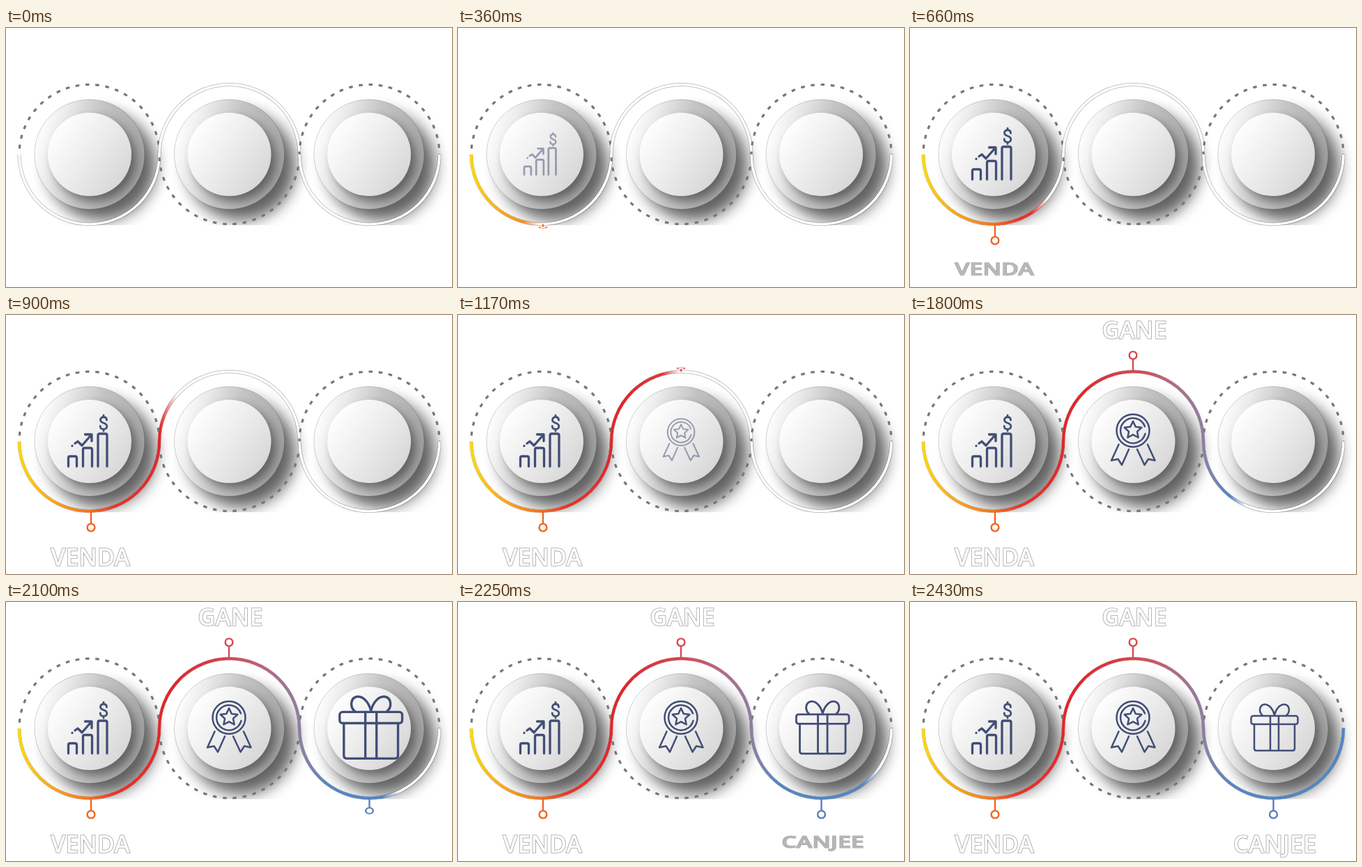
Write an HTML page that moves like this. It is 640 by 373 pixels and loops after 8 s.

```html
<!DOCTYPE html>
<html lang="es">
<head>
<meta charset="utf-8">
<title>Venda, gane, canjee</title>
<style>
  html, body { margin: 0; width: 100%; height: 100%; overflow: hidden; background: #fff; }
  svg { display: block; width: 100%; height: 100%; }
  text { font: 600 34px "Open Sans", "Noto Sans", sans-serif; text-anchor: middle; }
  .halo { fill: none; stroke: #000; stroke-opacity: .36; stroke-width: 1.6; }
  .icon, .icon path, .icon circle, .icon rect {
    fill: none; stroke: #414e75; stroke-linecap: round; stroke-linejoin: round;
  }
  .track path { fill: none; }
</style>
</head>
<body>
<svg id="stage" viewBox="0 0 640 373">
  <defs>
    <linearGradient id="rim" x1="0" y1=".36" x2="1" y2=".64">
      <stop offset="0" stop-color="#fff"/>
      <stop offset=".2" stop-color="#ebebeb"/>
      <stop offset=".5" stop-color="#c4c4c4"/>
      <stop offset="1" stop-color="#a0a0a0"/>
    </linearGradient>
    <linearGradient id="face" x1=".1" y1=".2" x2=".9" y2=".8">
      <stop offset="0" stop-color="#fefefe"/>
      <stop offset=".5" stop-color="#ececec"/>
      <stop offset="1" stop-color="#d8d8d8"/>
    </linearGradient>
    <linearGradient id="hues" gradientUnits="userSpaceOnUse" x1="19" y1="0" x2="622" y2="0">
      <stop offset="0" stop-color="#ffd800"/>
      <stop offset=".08" stop-color="#f9a51b"/>
      <stop offset=".17" stop-color="#f3701f"/>
      <stop offset=".23" stop-color="#ec3028"/>
      <stop offset=".36" stop-color="#e32228"/>
      <stop offset=".5" stop-color="#d9444c"/>
      <stop offset=".59" stop-color="#b8667f"/>
      <stop offset=".67" stop-color="#8a7ea4"/>
      <stop offset=".73" stop-color="#5585c3"/>
      <stop offset="1" stop-color="#4f84c6"/>
    </linearGradient>
    <linearGradient id="edge">
      <stop offset=".94" stop-color="#fff"/>
      <stop offset="1" stop-color="#fff" stop-opacity="0"/>
    </linearGradient>
    <filter id="soft" x="-40%" y="-40%" width="180%" height="180%"><feGaussianBlur stdDeviation="11"/></filter>
    <filter id="inner" x="-30%" y="-30%" width="160%" height="160%"><feGaussianBlur stdDeviation="7"/></filter>
    <clipPath id="cut"><rect width="640" height="284"/></clipPath>
  </defs>
</svg>
<script>
const LOOP = 8000, STEP = 30, CY = 182, R = 100.5;
const stage = document.getElementById('stage');

const chart = `<g class="icon" stroke-width="3.3">
  <path d="M89.5 218V206q0-2.500 2.500-2.500h7q2.500 0 2.500 2.500V218M110.500 218V194q0-2.500 2.500-2.500h8q2.500 0 2.500 2.500V218M132 218V173.500q0-2.500 2.500-2.500h8q2.500 0 2.500 2.500V218"/>
  <path d="M95 188.500v.1M99 185l4-3 6 6 13.500-15.500M113.500 172H123V181.500"/>
  <path d="M144.500 151.500c0-3-2-4.500-4.500-4.500s-4.500 1.500-4.500 4 2 3.700 4.500 4.500 4.800 2 4.800 4.700-2.300 4.300-4.800 4.300-4.800-1.500-4.800-4.500M140 144.500v2.500M140 164.500v2.500" stroke-width="2.800"/>
</g>`;

function star(cx, cy, outer, inner) {
  const pts = Array.from({ length: 10 }, (_, i) => {
    const a = -Math.PI / 2 + i * Math.PI / 5, r = i % 2 ? inner : outer;
    return `${(cx + r * Math.cos(a)).toFixed(2)} ${(cy + r * Math.sin(a)).toFixed(2)}`;
  });
  return `M${pts.join('L')}Z`;
}

const medal = `<g class="icon" stroke-width="2.500">
  <circle cx="320" cy="166.500" r="23.500"/>
  <path d="M337.500 171A18 18 0 1 1 337 160.500M334 177.500a18 18 0 0 0 2-3"/>
  <path d="${star(320, 166, 13, 6.3)}"/>
  <path d="M299.500 186.500L289 209.500 298.500 207.500 304 216 314 193.500M326 193.500L336.500 216 342 207.500 351.500 209.500 341 186.500"/>
</g>`;

const gift = `<g class="icon" stroke-width="2.500">
  <rect x="489.500" y="164" width="67" height="12" rx="3"/>
  <path d="M494 176V211q0 3 3 3H549q3 0 3-3V176M517 164V214M529 164V214"/>
  <path d="M523 163C521 154 515 147 508.500 147.500 501 148.500 500 158.500 506 163.500M523 163C525 154 531 147 537.500 147.500 545 148.500 546 158.500 540 163.500"/>
</g>`;

// cx: disc, ring: track circle, px: pin, tx: label
const steps = [
  { cx: 120, ring: 119.5, px: 122, tx: 121, start: 60, lead: 5, dash: -3, down: true, label: 'VENDA', hue: '#f2641f', icon: chart, iy: 181 },
  { cx: 320.5, ring: 320.5, px: 320, tx: 322, start: 870, lead: 5, dash: -7, down: false, label: 'GANE', hue: '#da4a52', icon: medal, iy: 179 },
  { cx: 521, ring: 521.5, px: 521.5, tx: 523.5, start: 1680, lead: 18, dash: 1.5, down: true, label: 'CANJEE', hue: '#567fbd', icon: gift, iy: 180.5 }
];

const arc = (cx, down) => `M${cx - R} ${CY}A${R} ${R} 0 0 ${down ? 0 : 1} ${cx + R} ${CY}`;

const shadows = steps.map(s =>
  `<circle cx="${s.cx + 17}" cy="${CY + 17}" r="78" opacity=".62" filter="url(#soft)"/>`).join('');

const discs = steps.map((s, i) => `
  <clipPath id="disc${i}"><circle cx="${s.cx}" cy="${CY}" r="79"/></clipPath>
  <circle cx="${s.cx}" cy="${CY}" r="79" fill="url(#rim)" stroke="#000" stroke-opacity=".22" stroke-width=".8"/>
  <g clip-path="url(#disc${i})">
    <circle cx="${s.cx + 7}" cy="${CY + 8}" r="60" opacity=".44" filter="url(#inner)"/>
  </g>
  <circle cx="${s.cx}" cy="${CY}" r="60" fill="url(#face)"/>`).join('');

const period = Math.PI * R / 22, dashLength = 5.5;
const tracks = steps.map(s => `<g class="track">
  <path d="${arc(s.ring, !s.down)}" stroke="#777" stroke-width="3.200" stroke-dasharray="${dashLength} ${period - dashLength}" stroke-dashoffset="${dashLength / 2 - s.dash}"/>
  <path d="${arc(s.ring, s.down)}" stroke="#000" stroke-opacity=".3" stroke-width="5"/>
  <path d="${arc(s.ring, s.down)}" stroke="#fff" stroke-width="3.600"/>
</g>`).join('');

const moving = steps.map((s, i) => {
  const dir = s.down ? 1 : -1, base = CY + dir * R;
  return `
  <mask id="wipe${i}" maskUnits="userSpaceOnUse" x="0" y="0" width="640" height="373">
    <rect id="sweep${i}" y="0" width="400" height="373" fill="url(#edge)"/>
  </mask>
  <g class="track" mask="url(#wipe${i})">
    <path d="${arc(s.ring, s.down)}" stroke="url(#hues)" stroke-width="4"/>
  </g>
  <g id="pin${i}" stroke="${s.hue}" stroke-width="2.400" fill="#fff">
    <path d="M${s.px} ${base}v${dir * 18}"/>
    <circle cx="${s.px}" cy="${base + dir * 23.5}" r="5.400"/>
  </g>
  <g id="icon${i}">${s.icon}</g>
  <g id="label${i}">
    <text class="halo" x="${s.tx}" y="${s.down ? 361 : 34}">${s.label}</text>
    <text class="fill" x="${s.tx}" y="${s.down ? 361 : 34}">${s.label}</text>
  </g>`;
}).join('');

stage.insertAdjacentHTML('beforeend',
  `<g clip-path="url(#cut)">${shadows}</g>${discs}${tracks}${moving}`);

// Linear interpolation through [time, value] points
function along(points, t) {
  if (t <= points[0][0]) return points[0][1];
  for (let i = 1; i < points.length; i++) {
    const [t0, v0] = points[i - 1], [t1, v1] = points[i];
    if (t <= t1) return v0 + (v1 - v0) * (t - t0) / (t1 - t0);
  }
  return points[points.length - 1][1];
}

const ZOOM = [[130, .05], [300, .82], [420, 1.34], [470, 1.38], [540, 1.26], [600, 1]];
const ZOOM_FADE = [[140, 0], [300, .5], [410, 1]];
const GROW = [[270, 0], [300, .2], [420, .77], [510, 1]];
const UNFOLD = [[450, .4], [570, .69], [750, 1]];
const TEXT_FADE = [[440, 0], [560, 1]];
const LIGHT = [[450, 170], [600, 185], [750, 255]];

function pose(el, x, y, sx, sy, opacity) {
  el.setAttribute('transform', `translate(${x} ${y}) scale(${sx} ${sy}) translate(${-x} ${-y})`);
  el.setAttribute('opacity', opacity);
}

const parts = steps.map((s, i) => {
  const get = name => document.getElementById(name + i);
  const text = get('label');
  return { ...s, sweep: get('sweep'), pin: get('pin'), art: get('icon'), text, fill: text.querySelector('.fill') };
});

function draw(time) {
  for (const p of parts) {
    const t = time - p.start;
    // The wipe stops once its soft edge has left the ring
    const travel = t < 0 ? -60 : Math.min(p.lead + t * .27, 2 * R + 18);
    p.sweep.setAttribute('x', p.ring - R + travel - 388);
    const grow = along(GROW, t);
    pose(p.pin, p.px, p.down ? CY + R : CY - R, 1, grow, grow > 0 ? 1 : 0);
    const zoom = along(ZOOM, t);
    pose(p.art, p.cx, p.iy, zoom, zoom, along(ZOOM_FADE, t));
    pose(p.text, p.tx, p.down ? 340 : 30, 1, along(UNFOLD, t), along(TEXT_FADE, t));
    const v = Math.round(along(LIGHT, t));
    p.fill.setAttribute('fill', `rgb(${v},${v},${v})`);
  }
}

const begin = performance.now();
function tick() {
  const time = (performance.now() - begin) % LOOP;
  draw(Math.floor(time / STEP) * STEP);
  requestAnimationFrame(tick);
}
tick();
</script>
</body>
</html>
```
